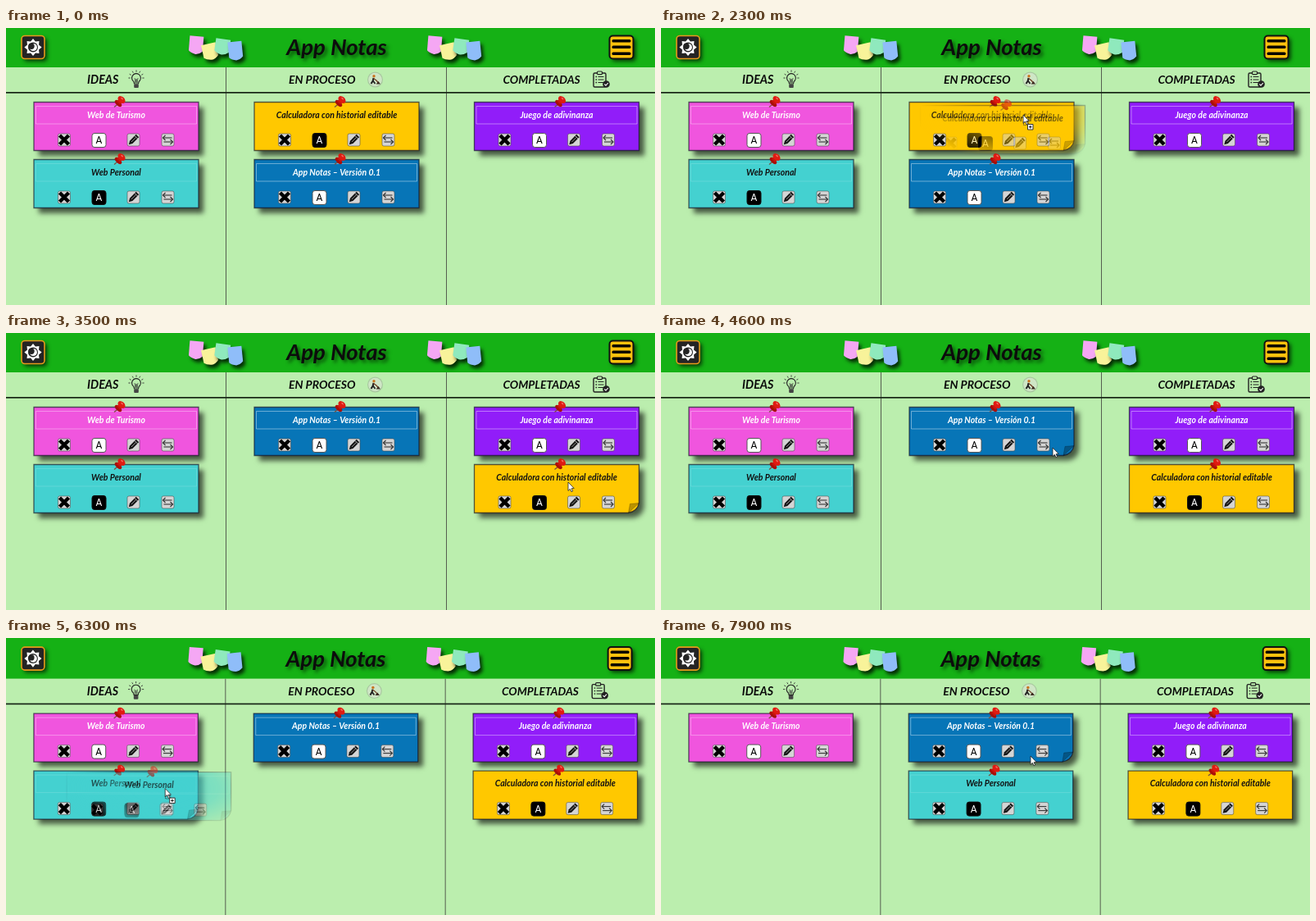
An HTML page with a canvas for the animation above (8 s loop, 792x338 px).

```html
<!DOCTYPE html>
<html lang="es">
<head>
<meta charset="utf-8">
<title>App Notas</title>
<style>
html, body { margin: 0; width: 100%; height: 100%; overflow: hidden; background: #bbeeae; }
canvas { display: block; }
</style>
</head>
<body>
<canvas id="stage" width="792" height="338"></canvas>
<script>
const stage = document.getElementById('stage');
const W = 792, H = 338, LOOP = 8000, STEP = 100;
const CARD_W = 201, CARD_H = 59;
const COLUMN_X = [34, 303, 571.5], ROW_Y = [90.5, 160.5];
const main = stage.getContext('2d');
const ghostLayer = document.createElement('canvas');
ghostLayer.width = W;
ghostLayer.height = H;
const ghost = ghostLayer.getContext('2d');

const cards = {
  tourism: { text: 'Web de Turismo', fill: '#f055de', light: true, line: .35 },
  personal: { text: 'Web Personal', fill: '#44d1d0', light: false, line: .15 },
  calc: { text: 'Calculadora con historial editable', fill: '#ffc800', light: false, line: 0 },
  notes: { text: 'App Notas – Versión 0.1', fill: '#0775b7', light: true, line: .4 },
  game: { text: 'Juego de adivinanza', fill: '#911df9', light: true, line: .4 }
};

const layouts = [
  { from: 0, columns: [['tourism', 'personal'], ['calc', 'notes'], ['game']] },
  { from: 3500, columns: [['tourism', 'personal'], ['notes'], ['game', 'calc']] },
  { from: 7200, columns: [['tourism'], ['notes', 'personal'], ['game']] }
];
layouts[2].columns[2].push('calc');

const drags = [
  { id: 'calc', from: 2200, to: 3500, grab: [428.5, 102] },
  { id: 'personal', from: 6200, to: 7200, grab: [154, 182] }
];

// time, x, y
const pointerPath = [
  [100, 462, 326], [900, 440, 150], [1500, 429, 102], [2200, 429, 102],
  [2300, 442, 106], [2900, 652, 172], [3400, 686, 182], [4100, 686, 182],
  [4600, 478, 140], [5000, 244, 168], [5400, 148, 180], [5800, 154, 182],
  [6200, 154, 182], [6700, 355, 190], [7100, 392, 194], [7400, 396, 190],
  [7900, 451, 144], [8000, 451, 144]
];

function pointerAt(t) {
  if (t < pointerPath[0][0]) return null;
  const i = pointerPath.findIndex(p => p[0] > t);
  const [t0, x0, y0] = pointerPath[i - 1], [t1, x1, y1] = pointerPath[i];
  const k = (t - t0) / (t1 - t0);
  return [x0 + (x1 - x0) * k, y0 + (y1 - y0) * k];
}

function placedCards(t) {
  const { columns } = layouts.filter(l => l.from <= t).pop();
  return columns.flatMap((ids, c) => ids.map((id, r) => ({ id, x: COLUMN_X[c], y: ROW_Y[r] })));
}

function box(c, x, y, w, h, r, fill, stroke, width = 1) {
  c.beginPath();
  c.roundRect(x, y, w, h, r);
  if (fill) { c.fillStyle = fill; c.fill(); }
  if (stroke) { c.strokeStyle = stroke; c.lineWidth = width; c.stroke(); }
}

function poly(c, points, fill, stroke, width = 1) {
  c.beginPath();
  points.forEach(([x, y]) => c.lineTo(x, y));
  c.closePath();
  if (fill) { c.fillStyle = fill; c.fill(); }
  if (stroke) { c.strokeStyle = stroke; c.lineWidth = width; c.stroke(); }
}

function line(c, points, color, width) {
  c.beginPath();
  points.forEach(([x, y]) => c.lineTo(x, y));
  c.strokeStyle = color;
  c.lineWidth = width;
  c.stroke();
}

function disc(c, x, y, rx, ry, fill, turn = 0) {
  c.beginPath();
  c.ellipse(x, y, rx, ry, turn, 0, 7);
  c.fillStyle = fill;
  c.fill();
}

function label(c, text, x, y, size, color, align = 'center') {
  c.font = `italic bold ${size}px Lato, sans-serif`;
  c.textAlign = align;
  c.fillStyle = color;
  c.fillText(text, x, y);
}

function shadow(c, dx, dy, blur, alpha) {
  c.shadowColor = `rgba(0,0,0,${alpha})`;
  c.shadowOffsetX = dx;
  c.shadowOffsetY = dy;
  c.shadowBlur = blur;
}

function at(c, x, y, draw, turn = 0) {
  c.save();
  c.translate(x, y);
  c.rotate(turn);
  draw();
  c.restore();
}

function drawPin(c) {
  line(c, [[-2, 3], [-7, 7]], '#77513f', 1.3);
  disc(c, -2, 2.5, 5.2, 2.6, '#a90e08', .75);
  line(c, [[-2, 2], [2, -2]], '#c9150d', 6);
  disc(c, 2, -2, 5.2, 3.6, '#df1b12', .75);
  disc(c, 2.6, -3.4, 1.6, .9, '#f2695b', .75);
}

function drawButtons(c, light) {
  const grey = '#d5d5d5', edge = 'rgba(70,70,70,.55)';
  at(c, 37, 46, () => {
    box(c, -7.5, -7.5, 15, 15, 2, grey, edge);
    line(c, [[-5.5, -5.5], [5.5, 5.5]], '#000', 4.5);
    line(c, [[5.5, -5.5], [-5.5, 5.5]], '#000', 4.5);
  });
  at(c, 79.5, 46.5, () => {
    box(c, -8.5, -8.5, 17, 17, 3, light ? '#fff' : '#000', light ? '#555' : '#111');
    c.font = '12px Roboto, sans-serif';
    c.textAlign = 'center';
    c.fillStyle = light ? '#000' : '#fff';
    c.fillText('A', 0, 4.2);
  });
  at(c, 121.5, 46, () => {
    box(c, -7.5, -7.5, 15, 15, 2, grey, edge);
    c.rotate(-Math.PI / 4);
    poly(c, [[-8, 0], [-4, -2.4], [7, -2.4], [7, 2.4], [-4, 2.4]], '#161616');
    line(c, [[-3.5, 0], [4, 0]], '#999', .9);
    line(c, [[4.6, -2.4], [4.6, 2.4]], '#ddd', .8);
  });
  at(c, 163.5, 46, () => {
    box(c, -7.5, -7.5, 15, 15, 2, grey, edge);
    line(c, [[-3, -5.5], [-6, -2.5], [-3, .5]], '#333', 1.1);
    line(c, [[-6, -2.5], [5, -2.5]], '#333', 1.1);
    line(c, [[3, -.5], [6, 2.5], [3, 5.5]], '#333', 1.1);
    line(c, [[6, 2.5], [-5, 2.5]], '#333', 1.1);
  });
}

function cardOutline(c, folded) {
  c.beginPath();
  c.moveTo(0, 0);
  c.lineTo(CARD_W, 0);
  if (folded) {
    c.lineTo(CARD_W, CARD_H - 12);
    c.quadraticCurveTo(CARD_W - 2, CARD_H - 2, CARD_W - 13, CARD_H);
  } else {
    c.lineTo(CARD_W, CARD_H);
  }
  c.lineTo(0, CARD_H);
  c.closePath();
}

function drawCard(c, { id, x, y }, folded, shaded = true) {
  const { text, fill, light, line: lineAlpha } = cards[id];
  at(c, x, y, () => {
    c.save();
    if (shaded) shadow(c, 6, 6, 6, .62);
    cardOutline(c, folded);
    c.fillStyle = fill;
    c.fill();
    c.restore();
    c.strokeStyle = 'rgba(20,20,40,.68)';
    c.lineWidth = 1.3;
    c.stroke();
    if (folded) {
      poly(c, [[CARD_W - 13, CARD_H], [CARD_W - 11, CARD_H - 11], [CARD_W, CARD_H - 12]],
        'rgba(0,0,0,.27)', 'rgba(0,0,0,.22)');
    }
    if (lineAlpha) box(c, 2.5, 5, 196, 21.5, 0, null, `rgba(255,255,255,${lineAlpha})`);
    label(c, text, 100.5, 19, 10.5, light ? '#fff' : '#111');
    drawButtons(c, light);
    at(c, 105, -1, () => drawPin(c));
  });
}

function drawStickies(c, x) {
  const notes = [
    [9, 21, 17, 22, '#f5a7f4', .08], [26, 29, 18, 20, '#f8f39a', -.22],
    [41, 23, 18, 19, '#8fe9bd', .14], [57, 28, 17, 23, '#8fbdf9', -.1]
  ];
  for (const [dx, y, w, h, color, turn] of notes) {
    at(c, x + dx, y, () => {
      shadow(c, 3, 4, 4, .75);
      c.beginPath();
      c.moveTo(-w / 2, -h / 2);
      c.lineTo(w / 2, -h / 2);
      c.lineTo(w / 2, h / 2 - 4);
      c.quadraticCurveTo(w / 4, h / 2, 0, h / 2);
      c.quadraticCurveTo(-w / 3, h / 2 - 1, -w / 2, h / 2 - 4);
      c.fillStyle = color;
      c.fill();
    }, turn);
  }
}

function drawThemeButton(c) {
  at(c, 33, 23.5, () => {
    c.save();
    shadow(c, 3, 3, 5, .7);
    box(c, -14, -14, 28, 28, 4, '#242424');
    c.restore();
    box(c, -14, -14, 28, 28, 4, null, '#e79a1c', 1.6);
    const star = Array.from({ length: 16 }, (_, i) => {
      const r = i % 2 ? 7.6 : 10.6, a = i * Math.PI / 8;
      return [r * Math.cos(a), r * Math.sin(a)];
    });
    poly(c, star, '#fff');
    disc(c, 0, 0, 6, 6, '#242424');
    disc(c, .3, 0, 4.6, 4.6, '#fff');
    disc(c, -2, -1.2, 3.7, 3.7, '#242424');
  });
}

function drawMenuButton(c) {
  c.save();
  shadow(c, 3, 3, 5, .7);
  box(c, 736.5, 9.5, 29, 28, 4, '#ffc20d');
  c.restore();
  box(c, 736.5, 9.5, 29, 28, 4, null, '#111', 2);
  for (const y of [14, 21.5, 29.5]) box(c, 739.5, y, 23, 3.4, 1.5, '#000');
}

function drawHeader(c) {
  c.fillStyle = '#15b115';
  c.fillRect(0, -4, W + 4, 52);
  drawThemeButton(c);
  drawMenuButton(c);
  drawStickies(c, 223);
  drawStickies(c, 514);
  c.save();
  shadow(c, 3, 3, 4, .55);
  label(c, 'App Notas', 403.5, 33, 27.5, '#0c0c0c');
  c.restore();
}

function drawBulb(c) {
  c.beginPath();
  c.arc(0, -2, 5.4, 2.2, .94);
  c.lineTo(2.5, 5);
  c.lineTo(-2.5, 5);
  c.closePath();
  c.strokeStyle = '#222';
  c.lineWidth = 1.1;
  c.stroke();
  line(c, [[-2, -2], [-1, 4], [0, -1], [1, 4], [2, -2]], '#333', .7);
  box(c, -2.8, 5.5, 5.6, 4.6, 1, '#444');
  for (let i = 0; i < 7; i++) {
    const a = Math.PI * (1 + i / 6), u = Math.cos(a), v = Math.sin(a);
    line(c, [[7.3 * u, -2 + 7.3 * v], [9.6 * u, -2 + 9.6 * v]], '#333', .9);
  }
}

function drawWorker(c) {
  disc(c, 0, 0, 9.5, 9.5, '#a9c8a0');
  disc(c, 0, 0, 8.3, 8.3, '#cfe6c6');
  disc(c, -1.5, -4.2, 1.7, 1.7, '#c9741d');
  line(c, [[-2, -2], [-2.8, 1.5], [-5, 5]], '#222', 2);
  line(c, [[-2.5, 1.5], [0, 5]], '#222', 1.7);
  line(c, [[-2, -1.5], [1.5, 1], [4, 4]], '#6b3a20', 1.2);
  poly(c, [[1, 5.5], [4, 2], [6.5, 5.5]], '#3a2a20');
}

function drawClipboard(c) {
  box(c, -9, -8, 15, 17, 1.5, null, '#222', 1.4);
  box(c, -4.5, -10, 6, 3.6, 1, '#bbeeae', '#222', 1.2);
  for (const y of [-3.5, 0, 3.5]) {
    line(c, [[-6.5, y], [-5, y]], '#222', 1.3);
    line(c, [[-3.5, y], [3.5, y]], '#222', 1);
  }
  disc(c, 6.5, 5.5, 4.3, 4.3, '#222');
  line(c, [[4.4, 5.5], [6, 7.2], [8.8, 4]], '#fff', 1.1);
}

function drawColumns(c) {
  c.fillStyle = '#555f50';
  for (const x of [268, 537]) c.fillRect(x, 48, 1, H);
  c.fillStyle = '#162414';
  c.fillRect(0, 78, W + 4, 1.7);
  label(c, 'IDEAS', 99, 68, 14.3, '#0a0a0a', 'left');
  label(c, 'EN PROCESO', 345, 68, 14, '#0a0a0a', 'left');
  label(c, 'COMPLETADAS', 606.5, 68, 13.8, '#0a0a0a', 'left');
  at(c, 159, 63, () => drawBulb(c));
  at(c, 450.5, 63, () => drawWorker(c));
  at(c, 726, 63, () => drawClipboard(c));
}

function drawPointer(c, [x, y], dragging) {
  at(c, x, y, () => {
    poly(c, [[0, 0], [0, 10.5], [2.4, 8.3], [4, 11.8], [5.6, 11], [4.1, 7.7], [7.2, 7.5]], '#fff', '#222', .8);
    if (!dragging) return;
    c.setLineDash([1, 1]);
    box(c, .5, 8.5, 6, 4, 0, null, '#333');
    c.setLineDash([]);
    box(c, 5.5, 11.5, 6.5, 6.5, 0, '#fff', '#333');
    line(c, [[7, 14.75], [10.5, 14.75]], '#111', 1);
    line(c, [[8.75, 13], [8.75, 16.5]], '#111', 1);
  });
}

// Translucent copy of the card, fading away from the pointer
function drawGhost(card, drag, pointer, view) {
  ghost.setTransform(1, 0, 0, 1, 0, 0);
  ghost.clearRect(0, 0, W, H);
  ghost.save();
  ghost.translate(pointer[0] - drag.grab[0], pointer[1] - drag.grab[1]);
  ghost.transform(...view);
  drawCard(ghost, card, true, false);
  ghost.restore();
  ghost.save();
  ghost.globalCompositeOperation = 'destination-in';
  ghost.translate(...pointer);
  ghost.scale(1, .44);
  const fade = ghost.createRadialGradient(0, 0, 0, 0, 0, 130);
  fade.addColorStop(0, 'rgba(0,0,0,.72)');
  fade.addColorStop(.5, 'rgba(0,0,0,.5)');
  fade.addColorStop(1, 'rgba(0,0,0,0)');
  ghost.fillStyle = fade;
  ghost.fillRect(-W, -2 * H, 2 * W, 4 * H);
  ghost.restore();
  main.drawImage(ghostLayer, 0, 0);
}

function render(t) {
  const view = t < 6300 ? [1, 0, 0, 1, 0, 0] : [.9975, 0, 0, 1, 0, 1.6];
  const pointer = pointerAt(t);
  const drag = drags.find(d => t > d.from && t < d.to);
  const placed = placedCards(t);
  const isHovered = ({ id, x, y }) => {
    if (drag) return id === drag.id;
    if (!pointer) return false;
    const px = pointer[0] / view[0] - x, py = pointer[1] - view[5] - y;
    return px >= 0 && px <= CARD_W && py >= 0 && py <= CARD_H;
  };

  main.fillStyle = '#bbeeae';
  main.fillRect(0, 0, W, H);
  main.save();
  main.transform(...view);
  drawColumns(main);
  drawHeader(main);
  placed.forEach(card => drawCard(main, card, isHovered(card)));
  main.restore();
  if (drag) drawGhost(placed.find(p => p.id === drag.id), drag, pointer, view);
  if (pointer) drawPointer(main, pointer, !!drag);
}

const start = performance.now();
function tick() {
  const t = (performance.now() - start) % LOOP;
  render(Math.floor(t / STEP) * STEP);
  requestAnimationFrame(tick);
}
tick();
</script>
</body>
</html>
```
